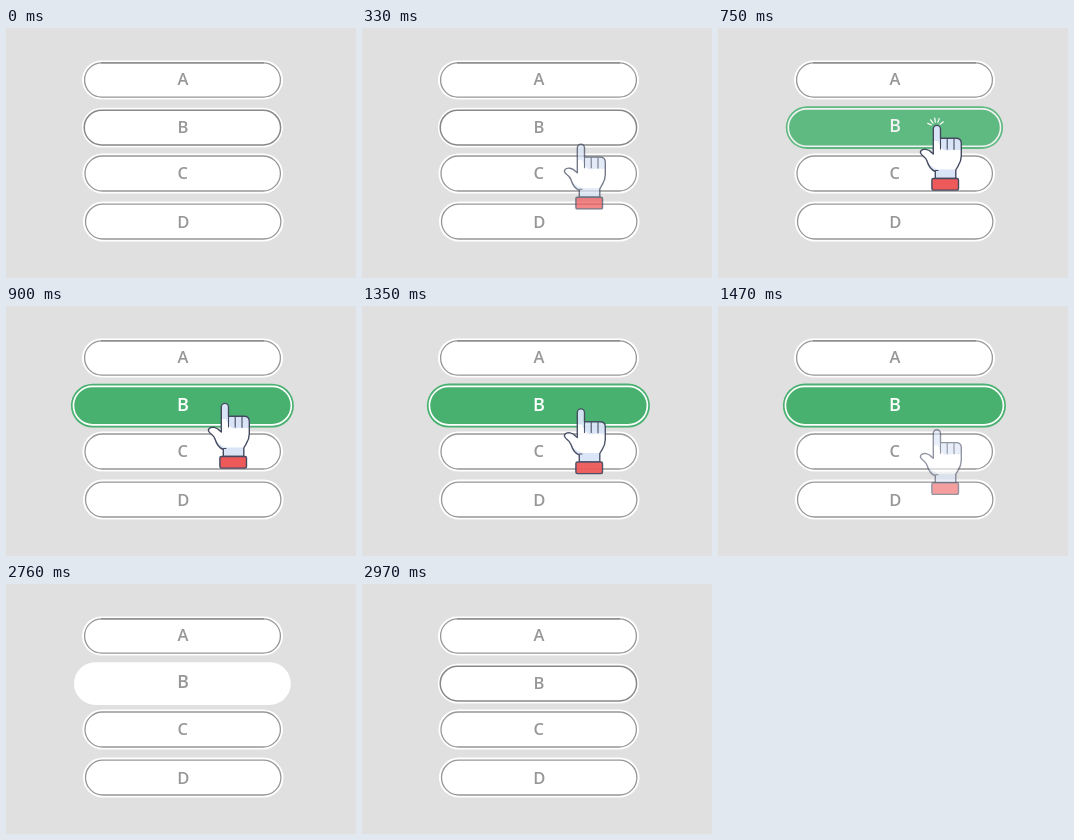
Recreate the animation shown at these times as an HTML page. Size 350 px wide and 250 px high, loop 3000 ms.

```html
<!DOCTYPE html>
<html lang="en">
<head>
<meta charset="utf-8">
<title>Answer choice</title>
<style>
  html, body { margin: 0; width: 100%; height: 100%; overflow: hidden; background: #e0e0e0; }
  svg { display: block; width: 350px; height: 250px; }
  text { font: 600 16.5px "Open Sans", "Noto Sans", sans-serif; text-anchor: middle; fill: #979797; }
  .pad { fill: #fff; }
  .ring { fill: none; stroke: #979797; stroke-width: 1.3; }
  .edge { stroke: #868686; stroke-width: 1.4; }
  .line { fill: none; stroke: #444a60; stroke-width: 1.4; stroke-linecap: round; stroke-linejoin: round; }
  #rays { fill: none; stroke: #fff; stroke-width: 1.2; stroke-linecap: round; }
</style>
</head>
<body>
<svg viewBox="0 0 350 250">
  <g>
    <rect class="pad" x="76" y="32.4" width="201" height="39" rx="19.5"/>
    <rect class="ring" x="78.6" y="34.9" width="195.8" height="34.2" rx="17.1"/>
    <path class="edge" d="M95 34.9H258"/>
    <text x="177" y="57">A</text>
  </g>
  <g>
    <rect class="pad" x="76.4" y="125.4" width="200.6" height="40" rx="20"/>
    <rect class="ring" x="79" y="128" width="195.4" height="35" rx="17.5"/>
    <text x="176.7" y="151">C</text>
  </g>
  <g>
    <rect class="pad" x="76.9" y="173.6" width="200.6" height="40" rx="20"/>
    <rect class="ring" x="79.5" y="176.2" width="195.4" height="34.8" rx="17.4"/>
    <text x="177.4" y="200">D</text>
  </g>
  <g id="choice">
    <rect id="pad" x="-100.5" y="-19.8" width="201" height="39.6" rx="19.8"/>
    <rect id="ring" x="-98.2" y="-17.3" width="196.4" height="34.6" rx="17.3" fill="none" stroke-width="1.5"/>
  </g>
  <text id="letter" x="177">B</text>
  <path id="rays"/>
  <g id="hand">
    <clipPath id="shape">
      <path id="outline" d="M215.3 126V101a3.6 3.6 0 0 1 7.2 0V110.3H238q5.3 0 5.3 5V128C243.3 135 240.5 137 237.8 142V150.5H217.3V143.5C213 142 210.5 138 209 133C208 130 206.5 129 204.5 127.5C202.8 126 202 124 203 122.8C205 120.3 211 121 213.5 124.5Z"/>
    </clipPath>
    <g clip-path="url(#shape)">
      <rect x="200" y="95" width="46" height="58" fill="#fff"/>
      <path fill="#d9e5f7" d="M214 96H244V120Q243 123 239.5 122T232.500 122T226 122T220 113H214ZM206 128Q211 139 220 141.500H240V152H206Z"/>
    </g>
    <path class="line" d="M215.3 126V101a3.6 3.6 0 0 1 7.2 0V110.3H238q5.3 0 5.3 5V128C243.3 135 240.5 137 237.8 142V150.5H217.3V143.5C213 142 210.5 138 209 133C208 130 206.5 129 204.5 127.5C202.8 126 202 124 203 122.8C205 120.3 211 121 213.5 124.500L215.300 126"/>
    <path class="line" style="stroke-width:1.1" d="M222.500 110V121M229.200 111V121M236 111V121.500M217.500 142.500H220"/>
    <rect class="line" style="fill:#ee5a5a" x="213.900" y="150.500" width="26.600" height="11.600" rx="1.500"/>
  </g>
</svg>
<script>
  const $ = id => document.getElementById(id);
  const LOOP = 3000, STEP = 30, DROP = 40;
  const WHITE = [255, 255, 255], GREEN = [73, 177, 112], GREY = [151, 151, 151], DARK = [134, 137, 134];

  const part = (t, from, length) => Math.min(1, Math.max(0, (t - from) / length));
  const easeOut = (p, power) => 1 - (1 - p) ** power;
  const expoOut = p => p >= 1 ? 1 : 1 - 2 ** (-10 * p);
  const mix = (a, b, p) => `rgb(${a.map((v, i) => Math.round(v + (b[i] - v) * p))})`;

  function drawHand(t) {
    let drop = 0, alpha = 0;
    if (t >= 1350 && t < 2760) {
      drop = DROP * easeOut(part(t, 1325, 350), 2);
      alpha = 0.95 - 0.91 * part(t, 1350, 300);
    } else if (t >= 240 && t < 1350) {
      const p = part(t, 220, 350);
      drop = DROP * (1 - easeOut(p, 2));
      alpha = easeOut(p, 3.5);
    }
    $("hand").setAttribute("transform", `translate(0 ${drop})`);
    $("hand").setAttribute("opacity", alpha);
  }

  function drawChoice(t) {
    let grow = 0, tint = 0, pale = 0;
    if (t >= 2760) {
      grow = 1 - easeOut(part(t, 2735, 235), 3);
      pale = 1 - part(t, 2760, 150);
    } else if (t >= 720) {
      const p = part(t, 700, 260);
      grow = expoOut(p);
      tint = pale = easeOut(p, 10);
    }
    $("choice").setAttribute("transform", `translate(176.4 99.6) scale(${1 + 0.11 * grow})`);
    $("pad").setAttribute("fill", mix(WHITE, GREEN, tint));
    $("ring").setAttribute("stroke", mix(DARK, WHITE, pale));
    const letter = $("letter");
    letter.setAttribute("y", 105 - 4.8 * grow * (1 - grow));
    letter.style.fontSize = 16.5 + 1.6 * grow + "px";
    letter.style.fill = mix(GREY, WHITE, tint);
  }

  function drawRays(t) {
    const p = part(t, 690, 210);
    const near = 3.5 + 5 * p, far = 5 + 5 * easeOut(p, 4) + p;
    const point = (a, r) => `${218 + r * Math.cos(a)} ${99 + r * Math.sin(a)}`;
    const path = [-156, -127, -98, -69, -35].map(deg => {
      const a = deg * Math.PI / 180;
      return `M${point(a, near)}L${point(a, far)}`;
    }).join("");
    $("rays").setAttribute("d", path);
    $("rays").setAttribute("opacity", t >= 720 ? 1 - part(t, 750, 150) : 0);
  }

  const start = performance.now();
  function tick() {
    // Small lead so that a step is never drawn late.
    const t = Math.floor((performance.now() - start + 8) / STEP) * STEP % LOOP;
    drawHand(t);
    drawChoice(t);
    drawRays(t);
    requestAnimationFrame(tick);
  }
  tick();
</script>
</body>
</html>
```
